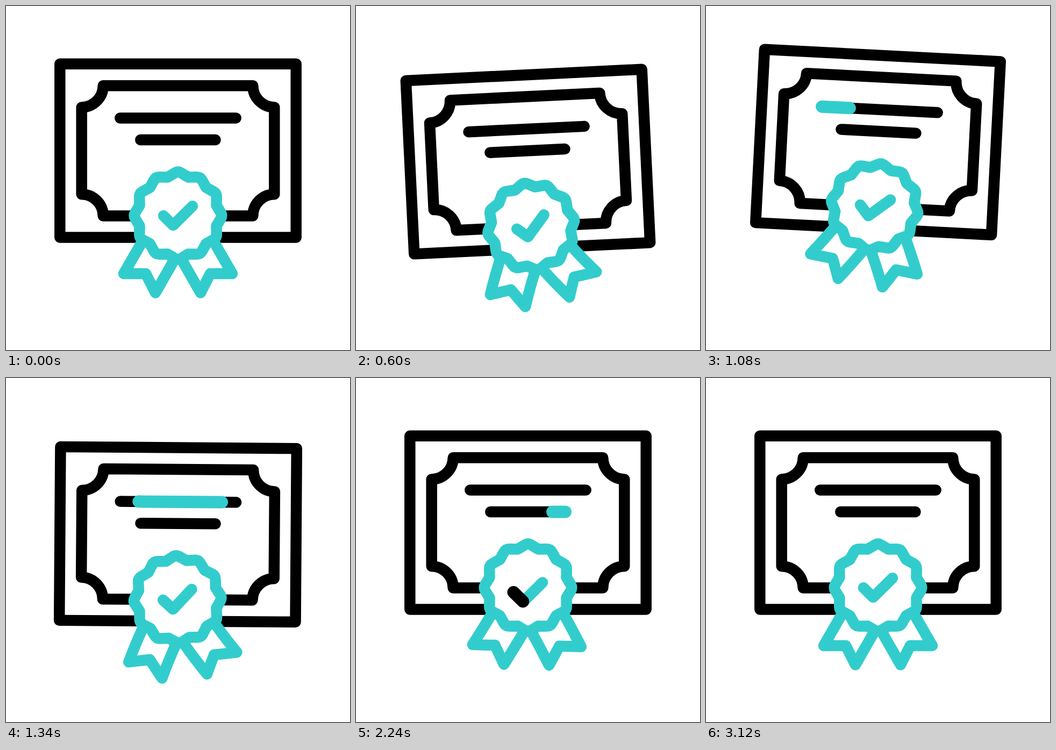
An HTML page for the animation above (3.22 s loop, 640 by 640 pixels).

```html
<!DOCTYPE html>
<html lang="en">
<head>
<meta charset="utf-8">
<title>Certificate</title>
<style>
  @property --head { syntax: "<number>"; inherits: false; initial-value: 0; }
  @property --tail { syntax: "<number>"; inherits: false; initial-value: 0; }

  html, body { margin: 0; width: 100%; height: 100%; overflow: hidden; background: #fff; }
  svg { display: block; width: 100%; height: 100%; }

  path, rect {
    fill: none;
    stroke: #000;
    stroke-width: 20.5px;
    stroke-linecap: round;
    stroke-linejoin: round;
  }
  .teal { stroke: #33cccc; }
  .solid { fill: #fff; }

  #card, #seal, #check {
    animation: 3220ms cubic-bezier(.3333, 0, .6667, 1) infinite;
  }
  #card { transform-origin: 320px 269.3px; animation-name: bob, tilt; }
  #seal { transform-origin: 320px 390px; animation-name: swing; }
  #check { animation-name: hop; }

  /* A bright stretch that runs along a path: head leads, tail follows. */
  .sweep {
    stroke-dasharray: calc(var(--head) - var(--tail)) 2;
    stroke-dashoffset: calc(var(--tail) * -1);
    stroke-width: calc(min(1, (var(--head) - var(--tail)) * 99) * 23px);
    animation: 3220ms cubic-bezier(.3333, 0, .6667, 1) infinite;
    animation-name: head, tail;
  }
  .first { animation-delay: 901ms, 1199ms; }
  .second { animation-delay: 1560ms, 1826ms; }
  .third { animation-delay: 2026ms, 2322ms; }

  @keyframes bob {
    0%, 54.35%, 100% { translate: 0 0; }
    15.06% { translate: 0 32px; }
    28.26% { translate: 0 -31.5px; }
    43.48% { translate: 0 24px; }
  }
  @keyframes tilt {
    0%, 7.11% { rotate: 0deg; }
    21.12% { rotate: -3deg; }
    34.16% { rotate: 3deg; }
    48.76% { rotate: -2deg; }
    59.01%, 100% { rotate: 0deg; }
  }
  @keyframes swing {
    0% { rotate: 0deg; }
    15.06% { rotate: -10deg; }
    28.26% { rotate: 9.4deg; }
    43.48% { rotate: -3deg; }
    54.35% { rotate: 1.7deg; }
    66.77%, 100% { rotate: 0deg; }
  }
  @keyframes hop {
    0%, 62.73% { translate: 0 0; }
    71.43% { translate: 0 9.2px; }
    83.85% { translate: 0 -6px; }
    96.6%, 100% { translate: 0 0; }
  }
  @keyframes head {
    0% { --head: 0; }
    17.5%, 50% { --head: 1; }
    50.01%, 100% { --head: 0; }
  }
  @keyframes tail {
    0% { --tail: 0; }
    17.5%, 50% { --tail: 1; }
    50.01%, 100% { --tail: 0; }
  }
</style>
</head>
<body>
<svg viewBox="0 0 640 640">
  <g id="card">
    <rect x="100.3" y="107.8" width="439.4" height="322.8"/>
    <path d="M180.7 148.2H459.3A40.2 40.2 0 0 0 499.3 188.4V350.2A40.2 40.2 0 0 0 459.3 390.4
             H180.7A40.2 40.2 0 0 0 140.7 350.2V188.4A40.2 40.2 0 0 0 180.7 148.2Z"/>
    <path d="M212.3 208.6H427.7"/>
    <path d="M250.3 249H389.5"/>
    <path class="teal sweep first" pathLength="1" d="M212.3 208.6H427.7"/>
    <path class="teal sweep second" pathLength="1" d="M250.3 249H389.5"/>
    <g id="seal">
      <path id="left" class="teal solid"/>
      <path id="right" class="teal solid"/>
      <path id="badge" class="teal solid"/>
      <g id="check">
        <path class="teal" d="M293 390.3L311 408L347 372.3"/>
        <path class="sweep third" pathLength="1" d="M293 390.3L311 408L347 372.3"/>
      </g>
    </g>
  </g>
</svg>
<script>
  const LOOP = 3220, CX = 320, CY = 390;
  const byId = id => document.getElementById(id);
  const polar = (r, a) => [CX + r * Math.cos(a), CY + r * Math.sin(a)];
  const mix = (p, q, k) => p.map((v, i) => v + (q[i] - v) * k);
  const fmt = p => p.map(v => v.toFixed(2)).join(" ");

  // Twelve rounded lobes with sharp valleys between them.
  function badgePath() {
    const step = Math.PI / 12;
    let d = "";
    for (let i = 0; i < 12; i++) {
      const a = i * 2 * step;
      const before = polar(74, a - step), tip = polar(83, a), after = polar(74, a + step);
      d += (i ? "L" : "M") + fmt(before) + "L" + fmt(mix(tip, before, .3)) +
           "Q" + fmt(tip) + " " + fmt(mix(tip, after, .3));
    }
    return d + "Z";
  }

  // Ribbon outline relative to the seal centre; the long sides are divided so they can curve.
  const outline = [[-60, 37], [-101, 108], [-60, 108], [-42, 143.5], [0, 70]];
  const ribbon = outline.slice(1).flatMap((q, i) =>
    Array.from({ length: 8 }, (_, k) => mix(outline[i], q, k / 8))
  ).concat([outline[4]]);

  // [time in ms, bend in degrees]
  const bends = [[0, 0], [480, -3.8], [960, 2.8], [1420, -4], [1800, 3.2], [2640, -1], [3115, 0], [LOOP, 0]];

  function bendAt(t) {
    const i = Math.max(1, bends.findIndex(b => b[0] > t));
    const [t0, v0] = bends[i - 1], [t1, v1] = bends[i];
    const p = (t - t0) / (t1 - t0);
    return v0 + (v1 - v0) * p * p * (3 - 2 * p);
  }

  function ribbonPath(side, bend) {
    return "M" + ribbon.map(([x, y]) => {
      const r = Math.hypot(x, y);
      const k = Math.max(0, (r - 50) / 100);
      return fmt(polar(r, Math.atan2(y, x * side) + bend * k * Math.PI / 180));
    }).join("L");
  }

  byId("badge").setAttribute("d", badgePath());
  const clock = byId("seal").getAnimations()[0];

  function draw() {
    const bend = bendAt((clock.currentTime || 0) % LOOP);
    byId("left").setAttribute("d", ribbonPath(1, bend));
    byId("right").setAttribute("d", ribbonPath(-1, bend));
    requestAnimationFrame(draw);
  }
  draw();
</script>
</body>
</html>
```
